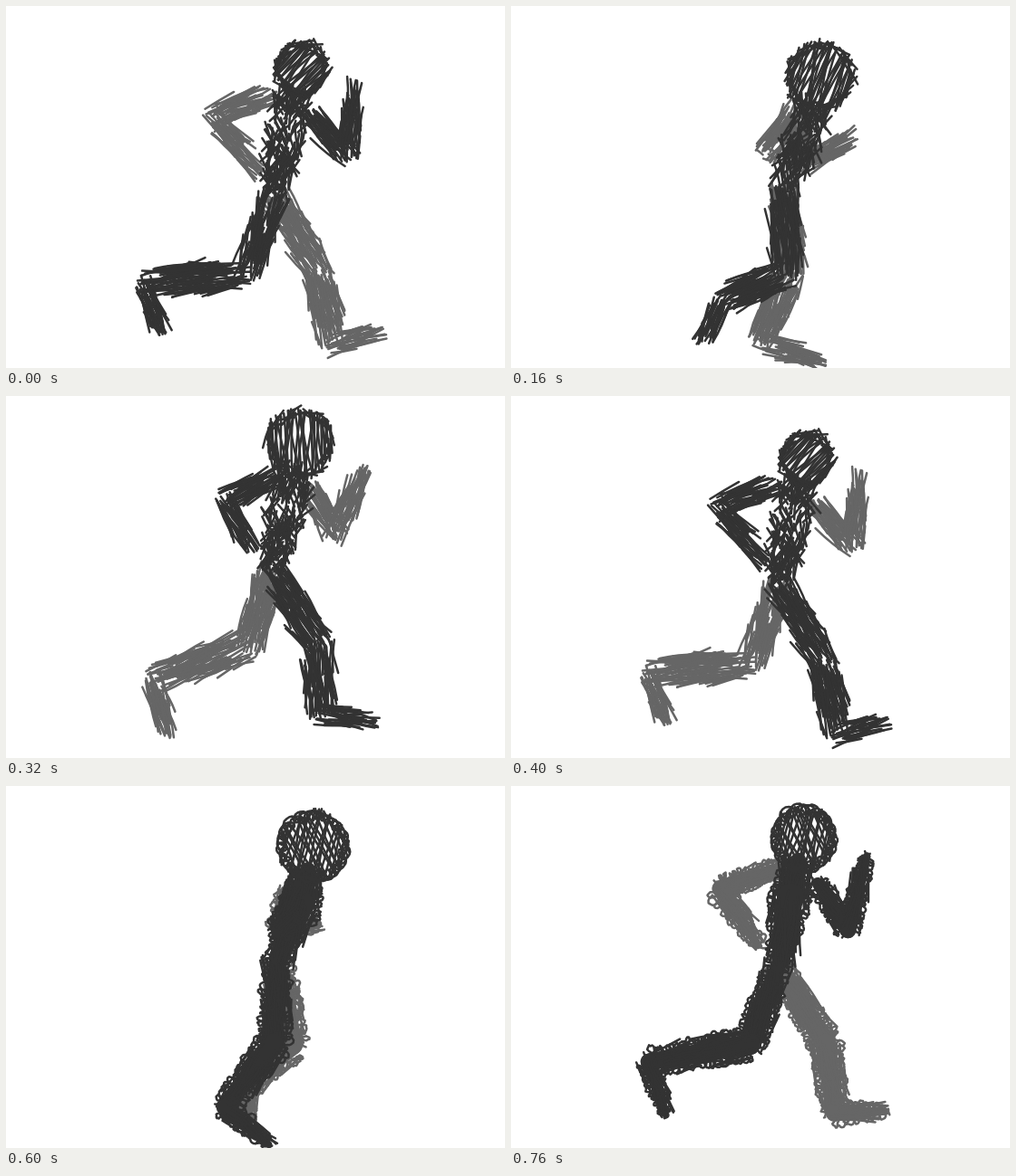
These frames come from a looping animation (550x400 px, 800 ms). An HTML page with a canvas:

```html
<!DOCTYPE html>
<html lang="en">
<head>
<meta charset="utf-8">
<title>Scribbled runner</title>
<style>
html, body { margin: 0; width: 100%; height: 100%; overflow: hidden; background: #fff; }
canvas { display: block; width: 550px; height: 400px; }
</style>
</head>
<body>
<canvas id="stage" width="550" height="400"></canvas>
<script>
const ctx = document.getElementById('stage').getContext('2d');
const STEP = 40, STRIDE = 20, HALF = 10, TAU = 2 * Math.PI;
const NEAR = '#333333', FAR = '#666666';
const LEG_R = [13, 18, 14, 6], ARM_R = [10, 14, 7], TORSO_R = [14, 23, 12];

// swing repeats once per stride, bob once per half stride; both peak at the given step.
// A positive flat value squares off the swing's turning points.
function swing(p, amp, peak, flat = 0) {
  const a = TAU * (p - peak) / STRIDE;
  return amp * (Math.cos(a) - flat * Math.cos(3 * a));
}
const bob = (p, amp, peak) => amp * Math.cos(TAU * (p - peak) / HALF);

const hip = p => [298 + bob(p, 4, 3), 199 + bob(p, 15, 1.6)];
const neck = p => [319 + bob(p, 9, 4.2), 108 + bob(p, 12, 2.6)];
const skull = p => [332 + bob(p, 9, 3.8), 68 + bob(p, 18, 2.4)];
const skullSize = p => 38 - 8 * Math.cos(Math.PI * p / HALF) ** 20;

const leg = p => [
  ...hip(p),
  305 + swing(p, 42, -0.8), 291 + bob(p, 18, 2),
  254 + swing(p, 104, -0.4), 340 + swing(p, 37, 1.2) + bob(p, 10, 2.7),
  284 + swing(p, 138, 0.2, 0.12) + bob(p, 8, 9), 372 + swing(p, 12, 4.5) + bob(p, 12, 4.8)
];
const arm = p => [
  316 + swing(p, 22, 9.2), 111 + swing(p, 10, 11) + bob(p, 16, 2.8),
  301 + swing(p, 74, 10), 152 + swing(p, 24, 10) + bob(p, 18, 3.2),
  332 + swing(p, 72, 10.3, 0.25), 141 + swing(p, 50, 19.7) + bob(p, 16, 3.2)
];

let rand;
function seed(n) {
  let a = (n + 1) * 7919;
  rand = () => {
    a = a + 0x6D2B79F5 | 0;
    let t = Math.imul(a ^ a >>> 15, 1 | a);
    t = t + Math.imul(t ^ t >>> 7, 61 | t) ^ t;
    return ((t ^ t >>> 14) >>> 0) / 4294967296;
  };
}
const vary = d => (rand() * 2 - 1) * d;

function ink(color, id) {
  seed(id);
  ctx.strokeStyle = ctx.fillStyle = color;
  ctx.lineWidth = 2.5;
  ctx.lineCap = ctx.lineJoin = 'round';
}

function dash(x, y, angle, len) {
  const dx = Math.cos(angle) * len / 2, dy = Math.sin(angle) * len / 2;
  const bow = vary(0.15);
  ctx.beginPath();
  ctx.moveTo(x - dx, y - dy);
  ctx.quadraticCurveTo(x - dy * bow, y + dx * bow, x + dx, y + dy);
  ctx.stroke();
}

// Uneven loops along one edge of a tapered segment
function coil(len, r0, r1, side) {
  const turns = Math.ceil(len / 6);
  let size = 4, lift = 0;
  ctx.beginPath();
  for (let a = 0; a < turns * TAU; a += 0.4) {
    size += vary(1) + (4.2 - size) * 0.12;
    lift += vary(0.8) - lift * 0.1;
    const t = a / (turns * TAU);
    const r = r0 + (r1 - r0) * t - 3 + lift;
    ctx.lineTo(t * len + Math.cos(a) * size, side * (r + Math.sin(a) * size));
  }
  ctx.stroke();
}

// Works in the segment's own axes: x along it, y across it
function segment(x0, y0, x1, y1, r0, r1, loops, wild, density) {
  const len = Math.hypot(x1 - x0, y1 - y0);
  ctx.save();
  ctx.translate(x0, y0);
  ctx.rotate(Math.atan2(y1 - y0, x1 - x0));
  if (loops) {
    ctx.beginPath();
    ctx.arc(0, 0, r0 * 0.65, TAU / 4, TAU * 3 / 4);
    ctx.arc(len, 0, r1 * 0.65, -TAU / 4, TAU / 4);
    ctx.fill();
    coil(len, r0, r1, 1);
    coil(len, r0, r1, -1);
  }
  const n = Math.ceil(len * (r0 + r1) / (loops ? 80 : 38) * density);
  for (let i = 0; i < n; i++) {
    const l = Math.min(len * 0.8, (24 + rand() * 30) / (1 + wild));
    const x = l / 2 - 7 + rand() * (len - l + 14);
    const r = r0 + (r1 - r0) * Math.min(1, Math.max(0, x / len));
    const u = ((i * 0.618) % 1) * 2 - 1;
    dash(x, u * r, vary(0.22 + wild) - 0.08, l);
  }
  ctx.restore();
}

function limb(pts, radii, color, id, loops, wild = 0, density = 1) {
  ink(color, id);
  for (let i = 0; i + 1 < radii.length; i++)
    segment(...pts.slice(2 * i, 2 * i + 4), radii[i], radii[i + 1], loops, wild, density);
}

function head(k, loops) {
  const [x, y] = skull(k), r = skullSize(k);
  ink(NEAR, 900 + k);
  ctx.save();
  ctx.translate(x, y);
  const lean = loops ? 1.1 : -0.9 - 0.1 * k;
  for (const angle of [lean, lean + (loops ? 0.75 : 0.2)]) {
    const c = Math.cos(angle), s = Math.sin(angle);
    for (let d = 3 - r; d < r - 2; d += 3.5 + rand() * 2) {
      const half = Math.sqrt(r * r - d * d), slip = vary(3);
      dash(c * slip - s * d, s * slip + c * d, angle + vary(0.12), half * (1.7 + rand() * 0.4));
    }
  }
  // Loose outline, coiled on the rounder drawings and spiky on the others
  if (loops) {
    let w = 4;
    ctx.beginPath();
    for (let a = 0; a < 2 * TAU; a += 0.025) {
      w += vary(0.5) + (4.5 - w) * 0.08;
      const m = r * (0.92 + 0.04 * Math.sin(a * 2.3 + k));
      ctx.lineTo(Math.cos(a) * m + w * Math.cos(a * 18.5), Math.sin(a) * m + w * Math.sin(a * 18.5));
    }
    ctx.stroke();
  } else {
    for (let i = 0; i < 44; i++) {
      const a = i * TAU / 44, m = r * (0.9 + vary(0.1));
      dash(Math.cos(a) * m, Math.sin(a) * m, a + TAU / 4 + vary(0.5), 14 + rand() * 10);
    }
  }
  ctx.restore();
}

function draw(step) {
  const k = step % HALF, loops = k % 2 === 1;
  const far = step, near = (step + HALF) % STRIDE;
  const drawLeg = (p, color) => limb(leg(p), LEG_R, color, 100 + p, loops);
  const drawArm = (p, color, density) => limb(arm(p), ARM_R, color, 200 + p, loops, 0, density);

  ctx.fillStyle = '#fff';
  ctx.fillRect(0, 0, 550, 400);
  drawArm(far, FAR);
  drawLeg(far, FAR);
  // The near arm passes behind the body once per stride
  const behind = step === 4;
  if (behind) drawArm(near, FAR);
  drawLeg(near, NEAR);
  const [x, y] = skull(k), [nx, ny] = neck(k);
  const top = [x + (nx - x) * 0.5, y + skullSize(k) * 0.7];
  limb([...top, nx - 2, ny + 22, ...hip(k)], TORSO_R, NEAR, 400 + k, loops, loops ? 0 : 0.6, 1.3);
  head(k, loops);
  if (!behind) drawArm(near, NEAR);
}

let start, shown = 0;
function tick(now) {
  if (start === undefined) start = now;
  const step = Math.floor((now - start) / STEP) % STRIDE;
  if (step !== shown) draw(shown = step);
  requestAnimationFrame(tick);
}
draw(0);
requestAnimationFrame(tick);
</script>
</body>
</html>
```
